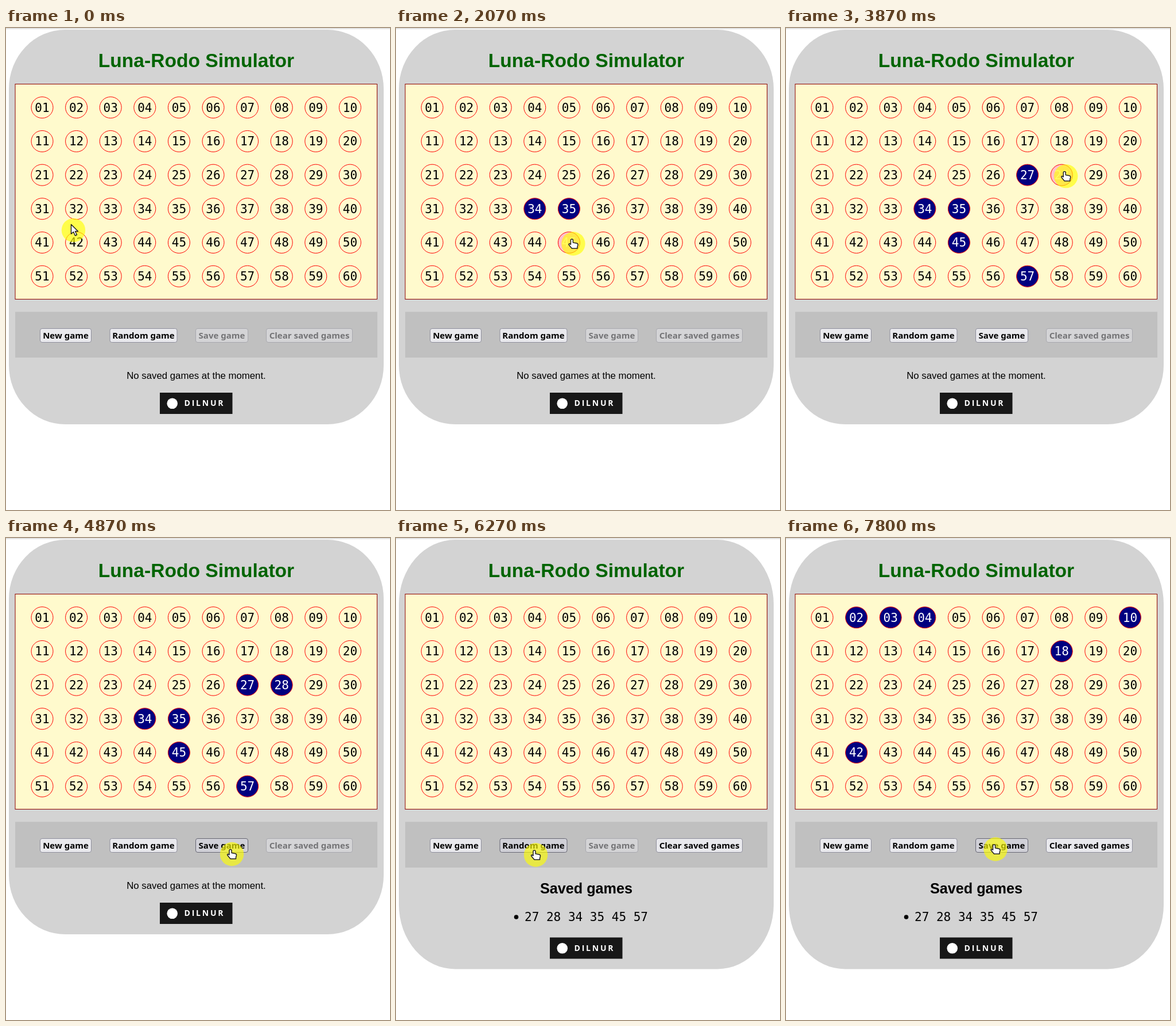
An HTML page for the animation above (8000 ms loop, 669 by 838 pixels).

```html
<!DOCTYPE html>
<html lang="en">
<head>
<meta charset="utf-8">
<title>Luna-Rodo Simulator</title>
<style>
html, body { margin: 0; height: 100%; overflow: hidden; background: #fff; }
svg { display: block; width: 669px; height: 838px; }
text { font: 16.8px "Liberation Sans", Arial, sans-serif; text-anchor: middle; }
.title { font-size: 33.6px; font-weight: bold; fill: #006400; }
.sub { font-size: 25.2px; font-weight: bold; }
.num { font: 21px "DejaVu Sans Mono", monospace; }
.ball ellipse { fill: none; stroke: red; }
.ball.on ellipse { fill: navy; }
.ball.down ellipse { fill: pink; }
.ball.on text, .ball.down text { fill: #fff; }
.btn rect { fill: #e9e9ed; stroke: #8f8f9d; }
.btn text { font: bold 15px "Noto Sans", "Open Sans", sans-serif; }
.btn.hover rect { fill: #d0d0d7; stroke: #676774; }
.btn.off rect { fill: #d4d4d6; stroke: #a8a8ae; }
.btn.off text { fill: #747476; }
.badge text { font: bold 14px "Open Sans", "Noto Sans", sans-serif; letter-spacing: 2.8px; fill: #fff; text-anchor: start; }
.pointer path { fill: #fff; stroke: #222; stroke-width: 1.5; stroke-linejoin: round; }
</style>
</head>
<body>
<svg viewBox="0 0 669 838">
  <defs>
    <linearGradient id="shade" x2="0" y2="1">
      <stop stop-color="#d6d6d6"/><stop offset="1" stop-color="#fff"/>
    </linearGradient>
  </defs>
  <rect width="669" height="3" fill="url(#shade)"/>
  <rect id="panel" x="5" y="3" width="653" rx="98" fill="#d3d3d3"/>
  <text class="title" x="331.5" y="67.5">Luna-Rodo Simulator</text>
  <rect x="16" y="97.5" width="630.5" height="374" fill="#fffacd" stroke="#8b0000"/>
  <g id="balls"></g>
  <rect x="16" y="493.5" width="631" height="79.5" fill="silver"/>
  <g id="buttons"></g>
  <text id="empty" x="331.5" y="610">No saved games at the moment.</text>
  <g id="saved">
    <text class="sub" x="331.5" y="618">Saved games</text>
    <circle cx="209.5" cy="659" r="3.8"/>
    <text class="num" x="331.5" y="666">27 28 34 35 45 57</text>
  </g>
  <g id="badge" class="badge">
    <rect x="268" y="634" width="126.5" height="37" fill="#171717"/>
    <circle cx="289.7" cy="652.8" r="9.3" fill="#fff"/>
    <text x="310.5" y="657.3">DILNUR</text>
  </g>
  <g id="pointer" class="pointer">
    <circle r="20.7" fill="#ff0" fill-opacity=".64"/>
    <path id="arrow" d="M-4-10v16.5l4-3.5 3 6.500 3-1.500-3-6h5z"/>
    <path id="hand" d="M-4.500-6a2 2 0 0 1 4 0v4l6.500 1.200q2.300 .5 2 3l-1 3.600v2.500h-9.500l-5-6q-1.200-2.200 1-2.300l2 1.300z"/>
  </g>
</svg>
<script>
const LOOP = 8000, STEP = 1000 / 15;
const $ = id => document.getElementById(id);

const balls = Array.from({ length: 60 }, (_, i) => ({
  n: i + 1, x: 63 + 59.6 * (i % 10), y: 138.2 + 58.7 * Math.floor(i / 10)
}));
$("balls").innerHTML = balls.map(({ n, x, y }) =>
  `<g class="ball"><ellipse cx="${x}" cy="${y}" rx="19" ry="18.5"/>
   <text class="num" x="${x}" y="${Math.round(y + 7.4)}">${String(n).padStart(2, "0")}</text></g>`).join("");

const buttons = [
  ["New game", 59.5, 89], ["Random game", 181, 117],
  ["Save game", 330.5, 91], ["Clear saved games", 453.5, 150]
];
$("buttons").innerHTML = buttons.map(([label, x, w]) =>
  `<g class="btn"><rect x="${x}" y="522.5" width="${w}" height="24" rx="3.5"/>
   <text x="${x + w / 2}" y="540">${label}</text></g>`).join("");

// The pointer glides from stop to stop; bend bows the way up or down.
const stops = [];
function go(x, y, leave, time, bend = 0) {
  stops.push({ x, y, leave, time, bend });
}
const picks = {};
function pick(n, leave, time, press, release, bend) {
  const { x, y } = balls[n - 1];
  go(x + 7.5, y + 2, leave, time, bend);
  picks[n] = { press, release };
}

go(117.5, 351.5, 0, 1);
pick(34, 67, 667, 930, 1000, -25);
pick(35, 1000, 300, 1330, 1400, 20);
pick(45, 1400, 267, 2060, 2130);
pick(57, 2133, 267, 2460, 2530, 25);
go(441, 293, 2533, 333);
pick(27, 2867, 200, 3060, 3130);
pick(28, 3133, 267, 3860, 4130);
go(393.5, 549.5, 4067, 266);
const saveAt = 5460;
go(243.5, 551, 5600, 666, 63);
const drawAt = 6460, drawn = [2, 3, 4, 10, 18, 42];
go(378, 541, 6933, 600, -8);
go(365, 541, 7733, 60);

function pointAt(t) {
  const k = stops.findLastIndex(s => s.leave <= t);
  const to = stops[k], from = stops[k - 1] || to;
  const f = Math.min(1, (t - to.leave) / to.time), e = 1 - (1 - f) ** 2;
  return [from.x + (to.x - from.x) * e,
          from.y + (to.y - from.y) * e + to.bend * Math.sin(Math.PI * e)];
}

function ballState(n, t) {
  if (t >= saveAt) return t >= drawAt && drawn.includes(n) ? "on" : "";
  const p = picks[n];
  return !p || t < p.press ? "" : t < p.release ? "down" : "on";
}

function render(now) {
  const t = Math.floor(((now % LOOP) + 4) / STEP) * STEP % LOOP;
  const [x, y] = pointAt(t), tipX = x - 4, tipY = y - 10;
  const saved = t >= saveAt, height = saved ? 746.5 : 686;
  let hot = false;

  balls.forEach((b, i) => {
    hot ||= Math.hypot(tipX - b.x, tipY - b.y) < 19;
    $("balls").children[i].setAttribute("class", "ball " + ballState(b.n, t));
  });

  const full = t >= picks[28].press && !saved || t >= drawAt;
  const enabled = [true, true, full, saved];
  buttons.forEach(([, left, w], i) => {
    const over = tipX > left && tipX < left + w && tipY > 522 && tipY < 547;
    hot ||= over;
    $("buttons").children[i].setAttribute("class", "btn " + (!enabled[i] ? "off" : over ? "hover" : ""));
  });

  $("panel").setAttribute("height", height);
  $("panel").setAttribute("ry", height * 0.15);
  $("badge").setAttribute("transform", `translate(0 ${height - 686})`);
  $("empty").style.display = saved ? "none" : "";
  $("saved").style.display = saved ? "" : "none";
  $("pointer").setAttribute("transform", `translate(${x} ${y})`);
  $("arrow").style.display = hot ? "none" : "";
  $("hand").style.display = hot ? "" : "none";
}

const start = performance.now();
(function tick() {
  render(performance.now() - start);
  requestAnimationFrame(tick);
})();
</script>
</body>
</html>
```
